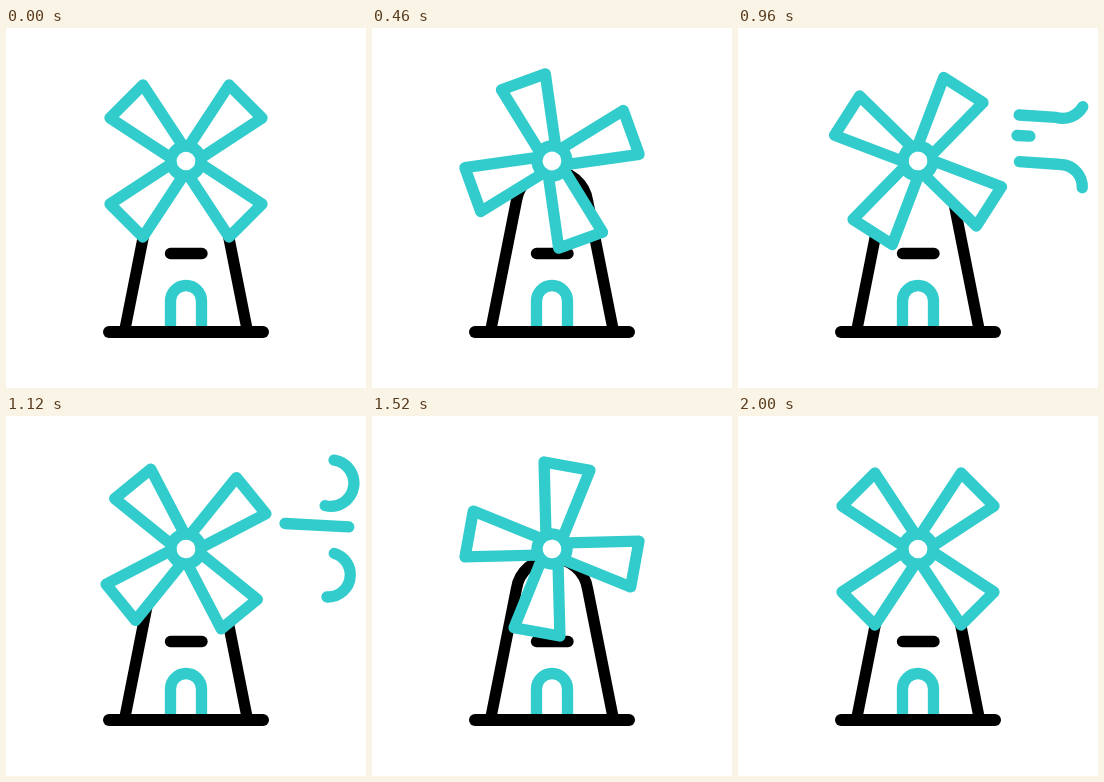
These frames come from a looping animation (360x360 px, 2400 ms). An HTML page:

```html
<!DOCTYPE html>
<html lang="en">
<head>
<meta charset="utf-8">
<title>Windmill</title>
<style>
  html, body { margin: 0; width: 100%; height: 100%; overflow: hidden; background: #fff; }
  svg { display: block; width: 100vw; height: 100vh; }
  g { fill: none; stroke-width: 11.3; stroke-linecap: round; stroke-linejoin: round; }
  .dark { stroke: #000; }
  .teal { stroke: #3cc; }
  #sails { fill: #fff; }
</style>
</head>
<body>
<svg viewBox="0 0 360 360">
  <g class="teal">
    <path d="M164.5 300V273a15.5 15.5 0 0 1 31 0V300"/>
  </g>
  <g class="dark">
    <path d="M119.2 300L144.4 173A36 36 0 0 1 215.6 173L240.8 300"/>
    <path d="M164.5 225.5H196"/>
    <path d="M103 304H257" stroke-width="12"/>
  </g>
  <g class="teal" id="wind">
    <path d="M279 133.5L323 136.5A22.2 22.2 0 0 1 321 181"/>
    <path d="M279 107.5L343.5 111"/>
    <path d="M281 87L318 89.3A23.2 23.2 0 1 0 327 44"/>
  </g>
  <g class="teal" id="sails"></g>
</svg>
<script>
const LOOP = 2400, END = 2000, STEP = 20;

// Sails speed up, cruise, then brake evenly to rest after one and a half turns.
const TURN = 540, CRUISE = 616, BRAKE = 1047, POWER = 2.25;
const SPEED = TURN / (CRUISE / POWER + (BRAKE - CRUISE) + (END - BRAKE) / 2);

// Gusts are drawn and wiped at the same pace, each a little after the last.
const PACE = 3.8, DRAWN = 1120, WIPED = 1356, LAG = 15;

const sails = document.getElementById('sails');
const gusts = [...document.querySelectorAll('#wind path')];

for (let a = 45; a < 360; a += 90)
  sails.innerHTML += `<path transform="rotate(${a})" d="M-8.7 -14L-23.3 -84.2H23.3L8.7 -14"/>`;
sails.innerHTML += '<circle r="15"/>';

function ease(t, from, to) {
  const s = Math.min(1, Math.max(0, (t - from) / (to - from)));
  return s * s * (3 - 2 * s);
}

function spinAngle(t) {
  if (t < CRUISE) return SPEED * CRUISE / POWER * (t / CRUISE) ** POWER;
  const braking = Math.max(0, t - BRAKE);
  return SPEED * (CRUISE / POWER + t - CRUISE - braking ** 2 / (2 * (END - BRAKE)));
}

function drawGust(gust, i, t) {
  const length = gust.getTotalLength();
  const sweep = finish => length * ease(t, finish + i * LAG - length * PACE, finish + i * LAG);
  const head = sweep(DRAWN), tail = sweep(WIPED);
  gust.setAttribute('visibility', head > tail ? 'visible' : 'hidden');
  gust.setAttribute('stroke-dasharray', `${head - tail} ${2 * length}`);
  gust.setAttribute('stroke-dashoffset', -tail);
}

function draw(time) {
  const t = Math.min(END, Math.floor(time % LOOP / STEP) * STEP);
  sails.setAttribute('transform', `translate(180 133) rotate(${-spinAngle(t)})`);
  gusts.forEach((gust, i) => drawGust(gust, i, t));
}

const start = performance.now();
function tick() {
  draw(performance.now() - start);
  requestAnimationFrame(tick);
}
tick();
</script>
</body>
</html>
```
